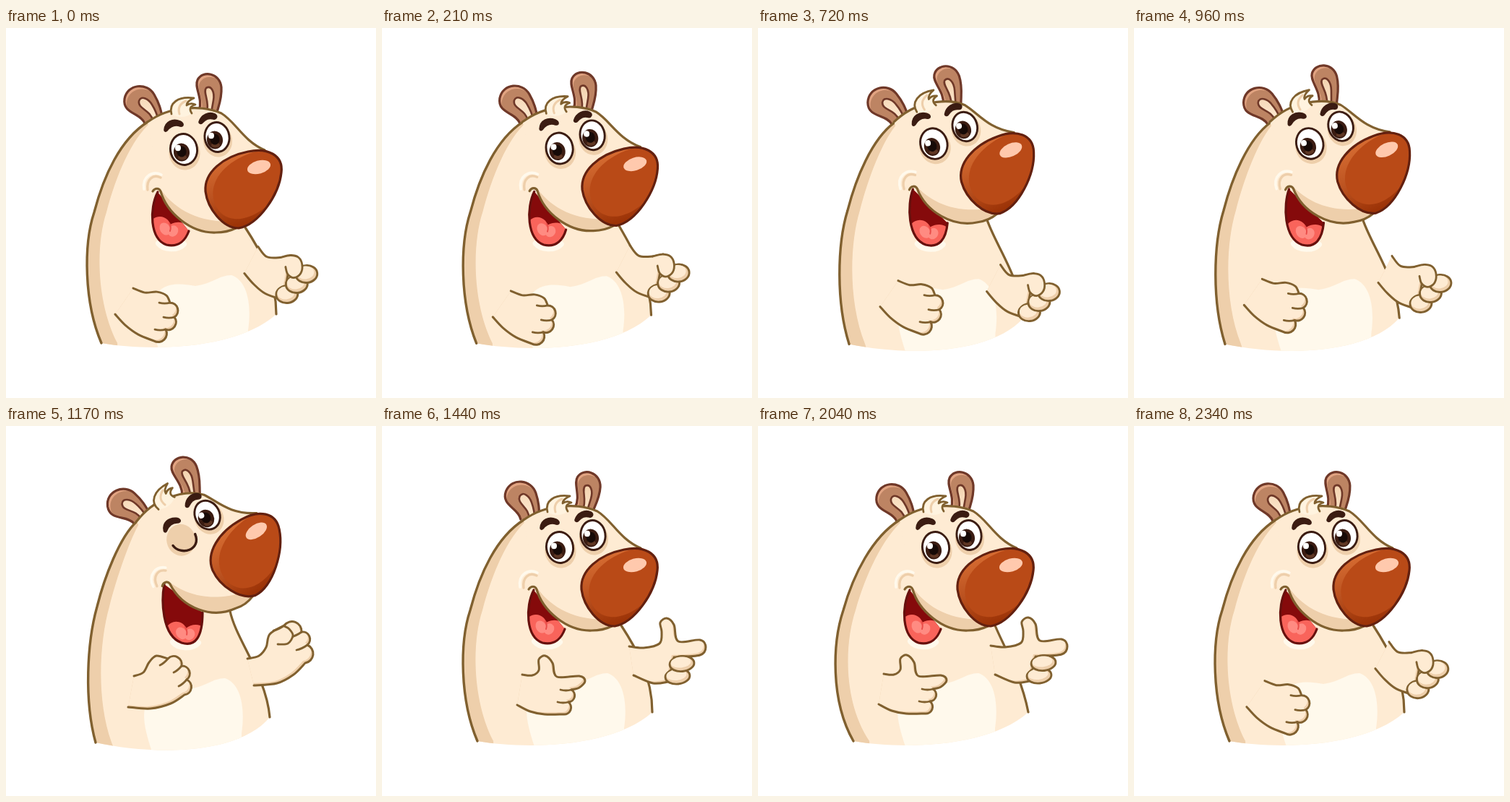
These frames come from a looping animation (512x512 px, 2370 ms). An HTML page with a canvas:

```html
<!DOCTYPE html>
<html lang="en">
<head>
<meta charset="utf-8">
<title>Cheerful bear</title>
<style>
html, body { margin: 0; width: 100%; height: 100%; overflow: hidden; background: #fff; }
canvas { display: block; width: 512px; height: 512px; }
</style>
</head>
<body>
<canvas id="stage" width="512" height="512"></canvas>
<script>
const ctx = document.getElementById('stage').getContext('2d');
const LOOP = 2370;
const SKIN = '#feebd3', TAN = '#eecfab', PALE = '#fff9ec', LINE = '#80602f', DARK = '#3b1c12';

// Timing helpers: smooth step from a to b, and a smooth bump around a centre
function ramp(t, a, b) {
  const u = Math.min(1, Math.max(0, (t - a) / (b - a)));
  return u * u * (3 - 2 * u);
}
const pulse = (t, mid, width) => ramp(t, mid - width, mid) - ramp(t, mid, mid + width);

// Drawing helpers
function fill(d, color) {
  ctx.fillStyle = color;
  ctx.fill(new Path2D(d));
}

function stroke(d, color = LINE, width = 3) {
  ctx.strokeStyle = color;
  ctx.lineWidth = width;
  ctx.stroke(new Path2D(d));
}

function oval(x, y, rx, ry, color, tilt = 0, line, width = 2.9) {
  ctx.beginPath();
  ctx.ellipse(x, y, rx, ry, tilt, 0, 7);
  ctx.fillStyle = color;
  ctx.fill();
  if (line) {
    ctx.strokeStyle = line;
    ctx.lineWidth = width;
    ctx.stroke();
  }
}

function group(draw, clip) {
  ctx.save();
  if (clip) ctx.clip(new Path2D(clip));
  draw();
  ctx.restore();
}

function turn(deg, x, y) {
  ctx.translate(x, y);
  ctx.rotate(deg * Math.PI / 180);
  ctx.translate(-x, -y);
}

function gradient(x1, y1, x2, y2, ...colors) {
  const g = ctx.createLinearGradient(x1, y1, x2, y2);
  colors.forEach((c, i) => g.addColorStop(i / (colors.length - 1), c));
  return g;
}

// Fills a shape with a shade left along its lower right edge
function shaded(d, color, shade, dx = -3, dy = -3) {
  fill(d, shade);
  group(() => { ctx.translate(dx, dy); fill(d, color); }, d);
}

const points = s => s.split(' ').map(p => p.split(',').map(Number));

// Smooth curve through a few points
function spline(s, cmd = 'M') {
  const p = points(s);
  let d = cmd + p[0];
  for (let i = 0; i < p.length - 1; i++) {
    const a = p[i - 1] || p[i], b = p[i], c = p[i + 1], e = p[i + 2] || c;
    d += 'C' + [b[0] + (c[0] - a[0]) / 6, b[1] + (c[1] - a[1]) / 6,
      c[0] - (e[0] - b[0]) / 6, c[1] - (e[1] - b[1]) / 6, ...c];
  }
  return d;
}

// h: head lift, s: body sway that follows it, lean: recoil
function drawBody(h, s, lean) {
  const edge = w => `M${132 - 8 * s + w * 1.3} ${436 + 2 * s}
    C${108 - 8 * lean + w} 380 ${107 + 5 * h - 4 * lean + w} 300 ${122 + 4 * h - 4 * lean + w} ${255 - 5 * h}
    C${135 + h - 3 * lean + w} ${205 + 5 * h} ${158 - h + w * .9} 154 ${196 - 15 * h + w * .3} ${130 + 2 * h}`;
  const flank = `${331 - 21 * s - 3 * lean} ${276 - 20 * s}
    C${350 - 32 * s - 10 * lean} ${305 - 10 * s} ${374 - 14 * s - 10 * lean} 345 ${374 - 9 * s} ${396 + 7 * s}`;
  const shape = `${edge(0)}L${flank}C320 ${445 + 12 * s} 200 ${448 + 7 * s} ${132 - 8 * s} ${436 + 2 * s}Z`;
  fill(shape, SKIN);
  group(() => {
    fill(edge(17) + 'L0 0L0 460L155 460Z', TAN);
    ctx.translate(-9 * s - 7 * lean, 7 * s);
    fill('M215 456C205 425 196 400 202 380C212 352 235 352 262 357C285 354 295 342 312 342C335 350 340 385 335 418L335 456Z', PALE);
  }, shape);
  stroke(edge(0), LINE, 3.4);
  stroke('M' + flank, LINE, 3.2);
}

function drawMouth(h) {
  const shape = `M${210 + 9 * h} ${227 - 8 * h}
    C${198 + 17 * h} ${250 - 10 * h} ${199 + 16 * h} ${292 - 2 * h} ${222 + 21 * h} 300
    C${240 + 22 * h} ${304 + 2 * h} ${249 + 23 * h} 292 ${253 + 19 * h} ${281 - 23 * h}`;
  group(() => {
    ctx.translate(20 * h, h);
    stroke('M211 298C218 307 238 308 246 299', PALE, 8);
  });
  fill(shape, '#850a0b');
  group(() => {
    ctx.translate(23 * h, 8 * h);
    turn(-8 * h, 226, 280);
    oval(213, 276, 15, 15, '#f9645b', .4);
    oval(237, 284, 18, 15, '#f9645b', -.2);
    oval(224, 288, 20, 16, '#f9645b');
    oval(220, 278, 7, 9, '#ff8b82', -.5);
    oval(231, 281, 7, 8, '#ff8b82', .6);
    stroke('M226 270q3 5 1 11', '#e94d49', 2);
  }, shape);
  stroke(shape, '#67100d', 3.2);
}

function drawEar(shape, inner, x, y, deg) {
  const rim = '#6f3828';
  group(() => {
    turn(deg, x, y);
    shaded(shape, '#bd8463', '#e2a482', 3, 4);
    stroke(shape, rim, 3.2);
    fill(inner, gradient(0, 84, 0, 125, '#f3d3b0', '#fde8cf'));
    stroke(inner, rim, 2.6);
  });
}

function drawEars(t) {
  const swing = 9 * pulse(t, 420, 300) + 12 * pulse(t, 1440, 260) + 3 * pulse(t, 2300, 150);
  drawEar('M192 132C186 117 161 119 164 98C168 77 195 75 205 92C212 104 214 112 217 126',
    'M203 128C200 113 182 112 184 101C187 92 198 99 202 106C207 114 209 119 211 128', 205, 130, swing);
  drawEar('M267 114C273 98 260 82 265 72C272 58 296 62 298 82C299 98 294 108 291 120',
    'M278 117C282 100 272 89 277 83C284 79 289 88 287 100L284 117', 281, 116,
    swing * .6 - 6 * pulse(t, 760, 300));
}

function drawEye(x, y, rx, ry) {
  const px = x - 3, py = y + 4;
  oval(x + 1, y + 5, rx + 3, ry + 2, TAN, -.15);
  oval(x, y, rx, ry, '#fff', -.15, DARK);
  oval(px, py, 11, 12.5, DARK, -.15);
  oval(px + 1, py + 7, 6, 3.5, '#5f3724');
  oval(px, py - 1, 6.5, 7.5, '#170a07', -.15);
  oval(px - 5, py - 6, 4, 4.2, '#fff');
}

function drawNose() {
  const shape = 'M276 226C274 200 300 178 335 171C362 165 384 176 381 200C378 230 350 272 322 277C300 277 279 250 276 226Z';
  fill(shape, gradient(290, 185, 315, 275, '#d56b31', '#bb5220', '#9c3307'));
  group(() => fill('M287 236C282 206 310 182 342 172L390 160L385 215C372 238 352 260 325 264C306 266 291 256 287 236Z', '#b94a17'), shape);
  stroke(shape, '#63200f', 3.2);
  oval(350, 192.5, 16.5, 9, '#ffc9ad', -.28);
}

function drawTuft(h) {
  const tuft = 'M229 119C225 104 238 94 260 97C253 100 250 103 250 107C254 104 258 104 262 106C255 108 253 112 257 118';
  group(() => {
    turn(-18 * h, 243, 118);
    fill(tuft + 'C250 124 238 125 229 119Z', '#fff3df');
    stroke('M240 119C237 109 242 104 249 101', TAN, 3);
    stroke(tuft, LINE, 2.8);
  });
}

function drawBrow(d, dx, dy) {
  group(() => {
    ctx.translate(dx, dy);
    fill(d, DARK);
    stroke(d, DARK, 1.6);
  });
}

function drawHead(h, s, wink) {
  const top = `M196 130C213 118 228 113 245 112C262 ${109 + 2 * s} 282 ${111 + 2 * s} ${298 - 2 * s} ${118 + 5 * s}
    C${318 - 7 * s} ${130 + 7 * s} ${328 - 6 * s} ${156 + 4 * s} 358 169`;
  const chin = `L318 277C310 ${281 + 2 * h} 300 ${283 + 3 * h} 290 ${283 + 3 * h}
    C255 ${284 + 6 * h} ${222 - 2 * h} ${255 + 9 * h} 214 226`;
  const shape = top + chin + 'Z';
  fill(shape, SKIN);
  group(() => fill('M213 222C230 246 258 268 310 268L340 300L200 300Z', TAN), shape);
  stroke(top, LINE, 3.2);
  stroke('M' + chin.slice(1) + 'C212 221 206 221 203 226', LINE, 3.2);
  stroke('M196 224C194 209 204 202 214 207', TAN, 3.4);
  stroke('M191 223C188 205 203 197 215 203', PALE, 3.6);

  drawTuft(h);
  if (wink) {
    oval(247, 173, 20, 22, TAN, .1);
    stroke('M234 177C240 194 270 195 268 171', DARK, 3.4);
  } else drawEye(246, 168, 18.5, 21.5);
  drawEye(292, 151, 17, 20.5);
  drawBrow('M219 141C220 129 231 125 241 129C247 132 246 137 241 136C233 133 227 137 223 142C221 144 219 143 219 141Z',
    wink ? 9 : 3 * h, wink ? 13 : -8 * h);
  drawBrow('M267 130C270 120 281 115 289 119C294 122 291 127 287 126C280 124 276 127 271 132C269 133 267 132 267 130Z', 0, 0);
  drawNose();
}

// upper and lower: points of the arm line; knuckles: dips between round fingers;
// crease: direction of the fold at each dip; fingers: a row of n ovals
const HANDS = {
  low: [{
    upper: '350,303 362,317 381,318 396,315',
    lower: '385,377 360,368 344,355 331,340',
    fingers: { n: 3, x: 417, y: 341, dx: -13.5, dy: 14, rx: 15, ry: 12 },
    thumb: '388,331 391,341 400,346 409,340 411,328 406,318 395,315 381,318'
  }, {
    upper: '178,357 194,363 211,362 224,367 229,377',
    knuckles: '235,397 223,414 207,430',
    lower: '207,430 185,421 167,408 153,393',
    crease: [-15, 0]
  }],
  up: [{
    upper: '334,322 350,318 360,306 365,288 385,276',
    knuckles: '409,285 417,303 414,328',
    lower: '414,328 398,344 375,356 343,359',
    crease: [-15, 7],
    thumb: '376,302 390,301 397,290 392,281 385,277'
  }, {
    upper: '177,346 190,341 198,327 208,318 224,322',
    knuckles: '243,332 250,351 247,372',
    lower: '247,372 228,384 200,391 169,389',
    crease: [-11, 9]
  }],
  point: [{
    upper: '342,305 362,307 384,301 387,285 385,272 394,266 404,275 410,298 440,296 448,306 440,317 404,320',
    lower: '396,354 375,356 348,345',
    fingers: { n: 2, x: 415, y: 329, dx: -6, dy: 17.5, rx: 17, ry: 10.5 }
  }, {
    upper: '194,344 208,345 217,338 217,323 226,318 236,328 242,347 273,346 281,353 273,362 262,365',
    knuckles: '258,382 251,399',
    lower: '251,399 225,399 205,395 187,386',
    crease: [-15, 0]
  }]
};

function drawHand({ upper, knuckles, lower, crease, fingers, thumb }) {
  let d = spline(upper), folds = '', last = points(upper).pop();
  if (knuckles) for (const p of points(knuckles)) {
    const r = Math.hypot(p[0] - last[0], p[1] - last[1]) * .52;
    d += `A${r} ${r} 0 0 1 ${p}`;
    folds += `M${last}q${crease[0] / 2} ${crease[1] / 2 + 2} ${crease}`;
    last = p;
  }
  d += spline(lower, 'L');
  shaded(d, SKIN, TAN);
  stroke(d);
  stroke(folds, LINE, 2.8);
  if (fingers) for (let i = fingers.n - 1; i >= 0; i--) {
    const x = fingers.x + i * fingers.dx, y = fingers.y + i * fingers.dy;
    oval(x, y, fingers.rx, fingers.ry, TAN, -.1, LINE);
    oval(x - 1.5, y - 2, fingers.rx - 3, fingers.ry - 3, SKIN, -.1);
  }
  if (thumb) {
    fill(spline(thumb), SKIN);
    stroke(spline(thumb), LINE, 2.8);
  }
}

// Fists circle one turn, slowly at first, then lift, point and recoil
function handShift(t, side, pose, recoil) {
  if (pose === 'up') return [0, 24 * (1 - ramp(t, 1060, 1170)) + 10 * ramp(t, 1240, 1340)];
  if (pose === 'point') return [-28 * (1 - ramp(t, 1290, 1410)) - 20 * recoil - 8 * ramp(t, 2170, 2250), -recoil];
  if (t > 2000) {
    const left = (LOOP - t) / 120;
    return [12 * left, -18 * left];
  }
  const turned = 2 * Math.PI * Math.pow(t / 1080, 1.7);
  const [x, y, rx, ry, start] = side ? [7, -2, 10, 12, 2.7] : [-8, 12, 15, 14, -1.1];
  return [x + rx * Math.cos(start - turned), y + ry * Math.sin(start - turned)];
}

function render(t) {
  const h = .5 * ramp(t, 0, 800) + .5 * ramp(t, 1040, 1170) - ramp(t, 1230, 1430);
  const sway = h * (2 - h);
  const recoil = t > 1590 && t < 2190 ? (1 - Math.cos((t - 1590) / 300 * 2 * Math.PI)) / 2 : 0;
  const pose = t < 1080 || t >= 2250 ? 'low' : t < 1320 ? 'up' : 'point';
  const tilt = draw => group(() => {
    ctx.translate(13 * h, -6 * h);
    turn(-17.5 * h, 208, 226);
    draw();
  });
  ctx.fillStyle = '#fff';
  ctx.fillRect(0, 0, 512, 512);
  ctx.lineCap = ctx.lineJoin = 'round';
  tilt(() => drawEars(t));
  drawBody(h, sway, recoil);
  drawMouth(h);
  tilt(() => drawHead(h, sway, t >= 1100 && t < 1310));
  HANDS[pose].forEach((hand, side) => group(() => {
    ctx.translate(...handShift(t, side, pose, recoil));
    drawHand(hand);
  }));
}

const start = performance.now();
function tick() {
  render((performance.now() - start) % LOOP);
  requestAnimationFrame(tick);
}
tick();
</script>
</body>
</html>
```
